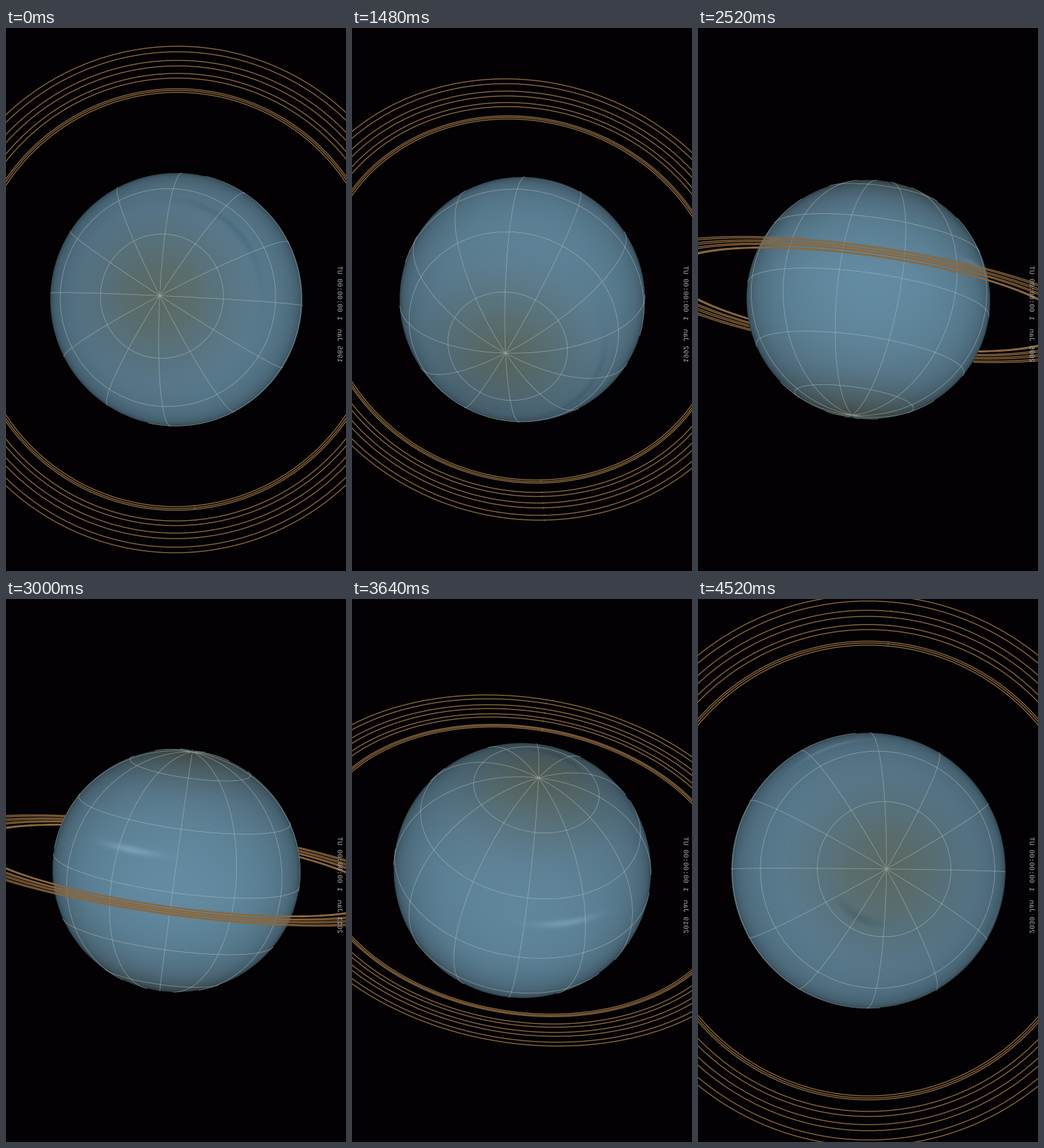
These frames come from a looping animation (501 px wide and 800 px high, 5.52 s). A matplotlib script:

```python
import numpy as np
import matplotlib.pyplot as plt
from matplotlib.animation import FuncAnimation
from matplotlib.patches import PathPatch
from matplotlib.path import Path
from matplotlib.textpath import TextPath

WIDTH, HEIGHT, DPI = 501, 800, 100
CENTER_X, CENTER_Y = 251.0, 400.0
X_SCALE = 0.997
SIZE_AT_1AU = 3718          # equatorial radius in pixels times distance in AU
OBLATE = 1 / 0.9771 ** 2 - 1
RING_RADII = np.array([41837, 42234, 42571, 44718, 45661,
                       47176, 48300, 50024, 51149]) / 25559
FIRST, LAST = 1985, 2030
STEP_MS = 40
HOLD = 25                   # steps the first and last year stay
PER_YEAR = 2

# latitude (absolute) and colour of the cloud tops
CLOUD_LAT = [0, 30, 45, 60, 75, 90]
CLOUD_RGB = np.array([(100, 140, 163), (97, 135, 156), (95, 129, 149),
                      (91, 119, 131), (91, 110, 111), (91, 104, 97)])
# latitude, longitude, height, length, brightness
CLOUDS = [(16.3, -126, 1.7, 14, 26), (18, 99, 1.7, 15, 24),
          (-39, -8, 2.2, 38, -10), (66, -31, 2.2, 28, -13)]


def unit(lon, lat):
    return np.array([np.cos(lat) * np.cos(lon), np.cos(lat) * np.sin(lon), np.sin(lat)])


TILT = np.radians(23.4393)
TO_ECLIPTIC = np.array([[1, 0, 0],
                        [0, np.cos(TILT), np.sin(TILT)],
                        [0, -np.sin(TILT), np.cos(TILT)]])
POLE = TO_ECLIPTIC @ unit(*np.radians([257.311, -15.175]))
NODE = TO_ECLIPTIC @ unit(*np.radians([347.311, 0]))
SIDE = np.cross(POLE, NODE)


class View:
    """The planet on 1 January of a year: screen axes, size and spin."""

    def __init__(self, year):
        days = 365 * (year - 2000) + np.ceil((year - 2000) / 4) - 0.5
        t = days / 36525
        peri, ecc = 170.954 + 0.408 * t, 0.047257
        mean = np.radians(313.2381 + 428.48203 * t - peri)
        anomaly = mean
        for _ in range(6):
            anomaly = mean + ecc * np.sin(anomaly)
        orbit = 19.18916 * np.array([np.cos(anomaly) - ecc,
                                     np.sqrt(1 - ecc ** 2) * np.sin(anomaly)])
        planet = complex(*orbit) * np.exp(1j * np.radians(peri))
        earth = 0.9833 * np.exp(1j * np.radians(100.3))
        distance = abs(planet - earth)
        lon = np.angle(planet - earth) + np.radians(0.3 + 0.035 * (year - 1985))
        # height above the ecliptic: inclination 0.77, ascending node 74 degrees
        height = np.radians(0.773) * (planet * np.exp(-1j * np.radians(74))).imag
        lat = height / distance

        self.radius = SIZE_AT_1AU / distance
        self.axes = np.array([unit(lon, lat + np.pi / 2),
                              unit(lon + np.pi / 2, 0),
                              -unit(lon, lat)])
        self.pole, self.node, self.side = (self.axes @ v for v in (POLE, NODE, SIDE))
        seen = days - distance * 0.0057755
        self.spin = (203.81 - 501.1600928 * seen
                     - 6.8 + 0.008 * (year - 2000) ** 2) % 360

    def place(self, lon, lat):
        """Points on the globe, one per column; angles in degrees."""
        lon, lat = np.broadcast_arrays(np.radians(lon + self.spin), np.radians(lat))
        r = 1 / np.sqrt(1 + OBLATE * np.sin(lat) ** 2)
        return r * (np.outer(self.node, np.cos(lat) * np.cos(lon))
                    + np.outer(self.side, np.cos(lat) * np.sin(lon))
                    + np.outer(self.pole, np.sin(lat)))

    def to_screen(self, p, visible):
        x = CENTER_X + p[0] * self.radius * X_SCALE
        y = CENTER_Y + p[1] * self.radius
        return np.where(visible, [x, y], np.nan)

    def hit(self, x, y):
        """Terms of the line of sight's crossing with the ellipsoid."""
        px, py, pz = self.pole
        c = x * px + y * py
        a = 1 + OBLATE * pz ** 2
        b = OBLATE * c * pz
        return a, b, b * b - a * (x * x + y * y + OBLATE * c * c - 1)

    def grid(self):
        sweep = np.linspace(0, 360, 541)
        half = np.linspace(-90, 90, 271)
        lines = [self.place(sweep, lat) for lat in (-60, -30, 0, 30, 60)]
        lines += [self.place(lon, half) for lon in range(0, 360, 30)]
        return join(self.to_screen(p, p[2] + OBLATE * (self.pole @ p) * self.pole[2] > 0)
                    for p in lines)

    def rings(self):
        turn = np.linspace(0, 2 * np.pi, 1441)
        circle = np.outer(self.node, np.cos(turn)) + np.outer(self.side, np.sin(turn))
        lines = []
        for r in RING_RADII:
            p = r * circle
            lines.append(self.to_screen(p, (p[2] > 0) | (self.hit(p[0], p[1])[2] < 0)))
        return join(lines)

    def surface(self):
        x = (np.arange(30, 472) + 0.5 - CENTER_X) / (self.radius * X_SCALE)
        y = (np.arange(180, 620) + 0.5 - CENTER_Y) / self.radius
        x, y = np.meshgrid(x, y)
        a, b, disc = self.hit(x, y)
        p = np.stack([x, y, (np.sqrt(np.maximum(disc, 0)) - b) / a])

        along = np.tensordot(self.pole, p, 1)
        normal = p + OBLATE * along * self.pole[:, None, None]
        size = np.sqrt((normal ** 2).sum(0))
        light = np.clip(normal[2] / size, 0.02, 1) ** 0.28
        lat = np.degrees(np.arcsin(np.clip(along / np.sqrt((p ** 2).sum(0)), -1, 1)))
        lon = np.degrees(np.arctan2(np.tensordot(self.side, p, 1),
                                    np.tensordot(self.node, p, 1))) - self.spin

        rgb = np.stack([np.interp(abs(lat), CLOUD_LAT, c) for c in CLOUD_RGB.T], -1)
        for lat0, lon0, height, length, gain in CLOUDS:
            d_lon = (lon - lon0 + 180) % 360 - 180
            rgb += gain * np.exp(-((lat - lat0) / height) ** 2
                                 - (d_lon / length) ** 2)[..., None]
        alpha = np.clip(disc / a / 2 * self.radius + 0.5, 0, 1) * 255
        image = np.dstack([rgb * light[..., None], alpha])
        return np.clip(image, 0, 255).astype(np.uint8)


def join(lines):
    """Chain polylines with gaps so that one artist draws them all."""
    gap = np.full((2, 1), np.nan)
    return np.hstack([part for line in lines for part in (line, gap)])


def date_path(year):
    # the date runs upwards and is mirrored: letter tops point right
    text = TextPath((0, 0), f"{year} Jan  1 00:00:00 UT", size=10.3,
                    prop={"family": "Liberation Mono"})
    u, v = text.vertices.T
    return Path(np.column_stack([488.8 + v, 492.8 - u]), text.codes)


fig = plt.figure(figsize=(WIDTH / DPI, HEIGHT / DPI), dpi=DPI, facecolor="#030104")
ax = fig.add_axes([0, 0, 1, 1])
globe = ax.imshow(np.zeros((440, 442, 4), np.uint8), extent=(30, 472, 620, 180),
                  interpolation="nearest", aspect="auto", zorder=1)
grid_line, = ax.plot([], [], color="#b4c0bd", alpha=0.6, lw=0.8 * 0.72, zorder=2)
ring_line, = ax.plot([], [], color="#8a673d", lw=1.4 * 0.72, zorder=3)
date = ax.add_patch(PathPatch(date_path(FIRST), fc="#b0b0b0", lw=0, zorder=4))
ax.set(xlim=(0, WIDTH), ylim=(HEIGHT, 0))
ax.axis("off")

scenes = {}


def scene(year):
    if year not in scenes:
        view = View(year)
        scenes[year] = view.surface(), view.grid(), view.rings(), date_path(year)
    return scenes[year]


def draw(step):
    passed = 0 if step < HOLD else (step - HOLD) // PER_YEAR + 1
    image, grid, rings, text = scene(min(FIRST + passed, LAST))
    globe.set_data(image)
    grid_line.set_data(*grid)
    ring_line.set_data(*rings)
    date.set_path(text)
    return globe, grid_line, ring_line, date


STEPS = 2 * HOLD + PER_YEAR * (LAST - FIRST - 1)
animation = FuncAnimation(fig, draw, frames=STEPS, interval=STEP_MS,
                          repeat=True, repeat_delay=0)
plt.show()
```
